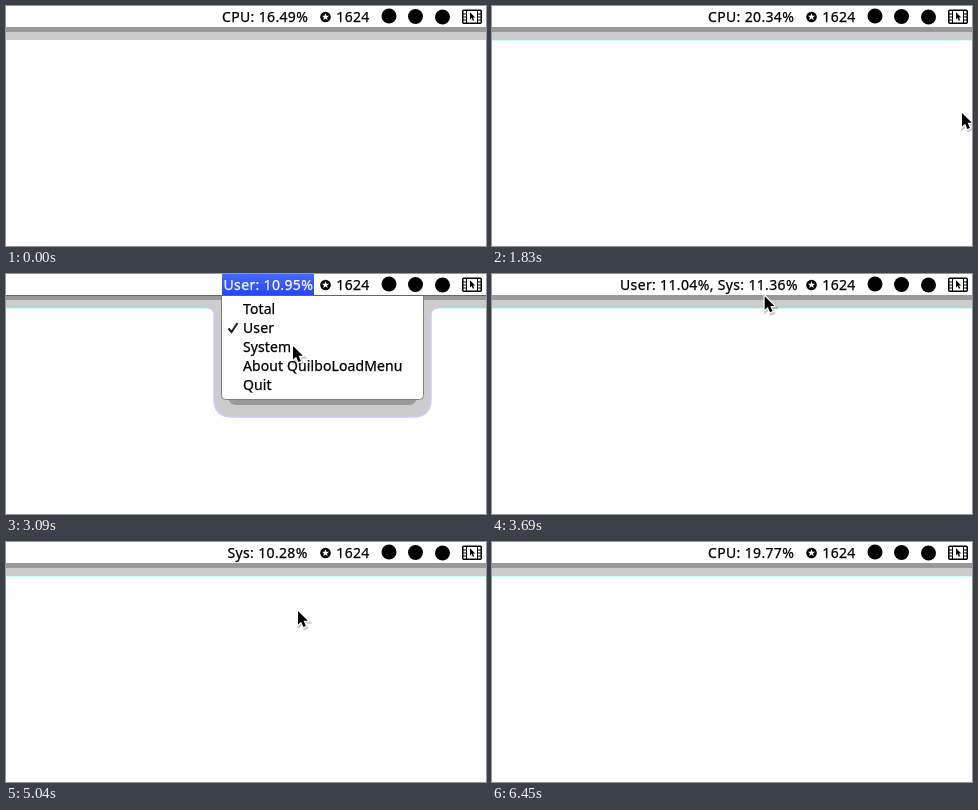
An HTML page for the animation above (6600 ms loop, 480 px wide and 240 px high).

```html
<!DOCTYPE html>
<html lang="en">
<head>
<meta charset="utf-8">
<title>CPU menu</title>
<style>
  html, body { margin: 0; width: 100%; height: 100%; overflow: hidden; background: #fff; }
  svg { display: block; width: 480px; height: 240px; }
  text {
    font: 14px "Noto Sans", "Open Sans", sans-serif; white-space: pre;
    fill: currentColor; stroke: currentColor; stroke-width: .25;
  }
  .bar { letter-spacing: .35px; }
  .row text { letter-spacing: .1px; }
  .row rect { fill: url(#blue); visibility: hidden; }
  .row path { fill: none; stroke: #222; stroke-width: 2; }
  .row.hover rect { visibility: visible; }
  .row.hover text { color: #fff; }
  .row.hover path { stroke: #fff; }
  .row:not(.checked) path { visibility: hidden; }
</style>
</head>
<body>
<svg viewBox="0 0 480 240" color="#000">
  <defs>
    <linearGradient id="blue" x2="0" y2="1">
      <stop stop-color="#4668ff"/><stop offset="1" stop-color="#2647f2"/>
    </linearGradient>
    <path id="arrow" d="M0 0V13.6L3.1 10.8 5.4 16 7.9 14.9 5.6 9.8H9.8Z"/>
  </defs>

  <rect y="21" width="480" height="5" fill="#999"/>
  <rect y="26" width="480" height="8" fill="#ccc"/>
  <rect id="fringe" y="34" width="480" height="1" fill="#cff"/>

  <g id="menu">
    <path d="M-15 34q7 0 7 7V125q0 18 18 18H191q18 0 18-18V41q0-7 7-7" fill="#ccc" stroke="#ccf" stroke-width="1.5"/>
    <rect x="-8" y="26" width="217" height="10" fill="#ccc"/>
    <rect x="-15" y="21" width="231" height="5" fill="#999"/>
    <rect x="6" y="100" width="189" height="31" rx="8" fill="#999"/>
    <path d="M-.5 21.5V121.5q0 4 4 4H197.5q4 0 4-4V21.5Z" fill="#fff" stroke="#808080"/>
    <g id="rows"></g>
  </g>

  <rect id="line" y="21" width="480" height="1" fill="#666"/>
  <rect id="highlight" height="21" fill="url(#blue)"/>
  <text id="title" class="bar" y="16"></text>

  <circle cx="319.5" cy="11" r="5.3"/>
  <path id="star" fill="#fff"/>
  <text class="bar" x="330.3" y="16">1624</text>
  <circle cx="383" cy="10" r="7.5"/>
  <circle cx="409.5" cy="10.5" r="7.5"/>
  <circle cx="436.5" cy="11" r="7.5"/>

  <g fill="none" stroke="#000">
    <rect x="456.75" y="4.25" width="18.5" height="13" rx="1" stroke-width="1.5"/>
    <path d="M460.5 4V18M471.5 4V18"/>
    <path d="M457 8H460M457 11H460M457 14H460M472 8H475M472 11H475M472 14H475"/>
  </g>
  <use href="#arrow" transform="translate(464 6.3) scale(.53)"/>

  <g id="cursor">
    <use href="#arrow" x="1" y="1.5" fill="#000" stroke="#000" stroke-width="3" opacity=".2"/>
    <use href="#arrow" stroke="#fff" stroke-width="2.4" stroke-linejoin="round"/>
    <use href="#arrow"/>
  </g>
</svg>

<script>
const LOOP = 6600, TICK = 30;
const RIGHT = 308, ROW_TOP = 25, ROW_HEIGHT = 19;
const $ = id => document.getElementById(id);

const titles = [
  [0, "CPU: 16.49%"], [240, "CPU: 16.87%"], [570, "CPU: 17.25%"], [900, "CPU: 17.62%"],
  [1230, "CPU: 18.91%"], [1560, "CPU: 20.34%"], [2220, "CPU: 20.98%"],
  [2520, "User: 10.62%"], [2850, "User: 10.95%"],
  [3210, "User: 11.04%, Sys: 11.36%"], [3840, "User: 11.20%, Sys: 11.90%"],
  [4200, "Sys: 11.57%"], [4710, "Sys: 10.28%"],
  [5520, "CPU: 20.15%"], [6090, "CPU: 19.42%"], [6450, "CPU: 19.77%"]
];

const menus = [
  { open: 2190, pick: 2400, close: 2430, gone: 2490, off: 2520, left: 210, checked: ["Total"] },
  { open: 2790, pick: 3060, close: 3180, gone: 3360, off: 3210, left: 216, checked: ["User"] },
  { open: 3840, pick: 4080, close: 4170, gone: 4290, off: 4200, left: 127, checked: ["User", "System"] },
  { open: 5250, pick: 5430, close: 5460, gone: 5550, off: 5520, left: 216, checked: ["System"] }
];

// Cursor stops: time, x, y
const stops = [
  [1830, 470, 107], [2130, 275, 13], [2190, 275, 13], [2370, 289, 52], [2490, 289, 52],
  [2700, 278, 13], [2790, 278, 13], [3000, 287, 72], [3510, 287, 72],
  [3750, 270, 13], [3840, 270, 13], [4020, 262, 55], [4140, 262, 55],
  [4560, 292, 69], [5040, 292, 69], [5190, 272, 13], [5250, 272, 13],
  [5370, 280, 37], [5460, 280, 37], [5700, 470, 106]
];

const labels = ["Total", "User", "System", "About QuilboLoadMenu", "Quit"];
$("rows").innerHTML = labels.map((label, i) =>
  `<g class="row" transform="translate(0 ${ROW_TOP + i * ROW_HEIGHT})">
    <rect width="201" height="${ROW_HEIGHT}"/>
    <path d="M6.5 10.5L9.5 14L15.5 5"/>
    <text x="21" y="15">${label}</text>
  </g>`).join("");
const rows = [...document.querySelectorAll(".row")];

$("star").setAttribute("d", "M" + Array.from({ length: 10 }, (_, i) => {
  const r = i % 2 ? 1.6 : 3.8, a = i * Math.PI / 5;
  return `${319.5 + r * Math.sin(a)} ${11 - r * Math.cos(a)}`;
}).join("L") + "Z");

const ramp = (t, from, to) => Math.min(1, Math.max(0, (t - from) / (to - from)));
const ease = p => p * p * (3 - 2 * p);
const show = (node, on) => node.setAttribute("visibility", on ? "visible" : "hidden");

function titleX(text) {
  if (text.includes(",")) return 128;
  return { C: 216, U: 217.5, S: 221.5 }[text[0]];
}

function cursorAt(t) {
  const next = stops.findIndex(stop => stop[0] > t);
  if (next === 0) return stops[0].slice(1);
  if (next < 0) return stops.at(-1).slice(1);
  const [t0, x0, y0] = stops[next - 1], [t1, x1, y1] = stops[next];
  const p = ease(ramp(t, t0, t1));
  return [x0 + (x1 - x0) * p, y0 + (y1 - y0) * p];
}

function drawMenu(t, y) {
  const menu = menus.find(m => t >= m.open && t < Math.max(m.gone, m.off));
  const lit = !!menu && t < menu.off;
  const visible = !!menu && t < menu.gone;
  show($("line"), lit);
  show($("highlight"), lit);
  show($("menu"), visible);
  $("title").setAttribute("color", lit ? "#fff" : "#000");
  if (!menu) return;

  $("highlight").setAttribute("x", menu.left);
  $("highlight").setAttribute("width", RIGHT - menu.left);
  $("menu").setAttribute("transform", `translate(${menu.left} 0)`);
  $("menu").setAttribute("opacity", 1 - ramp(t, menu.close, menu.gone));
  const hovered = t < menu.pick ? Math.floor((y - ROW_TOP) / ROW_HEIGHT) : -1;
  rows.forEach((row, i) => {
    row.classList.toggle("hover", visible && i === hovered);
    row.classList.toggle("checked", visible && menu.checked.includes(labels[i]));
  });
}

function draw(t) {
  const text = titles.findLast(entry => entry[0] <= t)[1];
  $("title").textContent = text;
  $("title").setAttribute("x", titleX(text));

  const [x, y] = cursorAt(t);
  $("cursor").setAttribute("transform", `translate(${x} ${y})`);
  $("cursor").setAttribute("opacity", t < stops[0][0] ? 0 : 1 - ramp(t, 6060, 6210));
  $("fringe").setAttribute("opacity", ramp(t, 0, 240));
  drawMenu(t, y);
}

const start = performance.now();
function frame() {
  const t = (performance.now() - start) % LOOP;
  draw(Math.floor(t / TICK) * TICK);
  requestAnimationFrame(frame);
}
frame();
</script>
</body>
</html>
```
